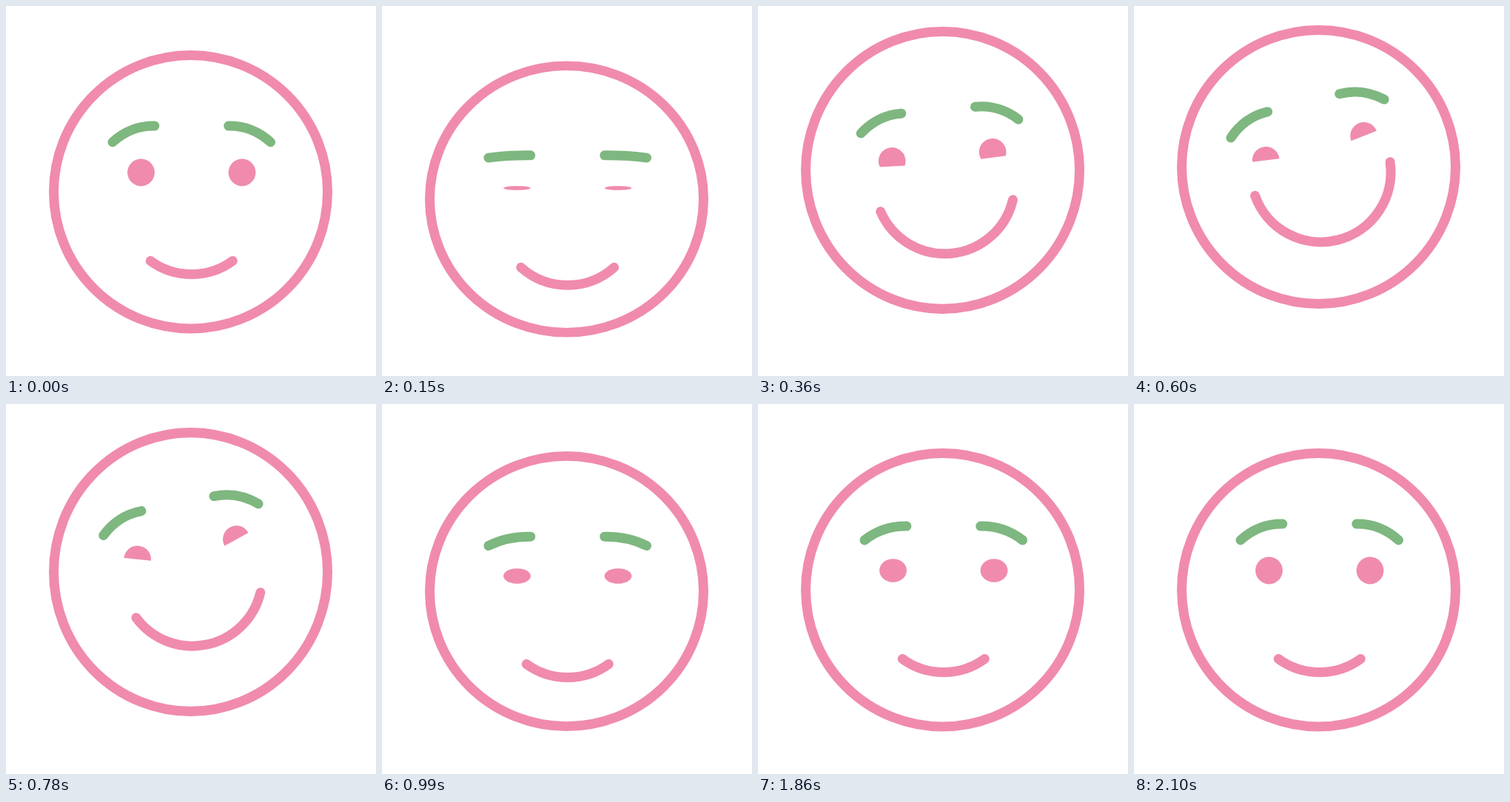
Animation, 500 px wide and 500 px high, one loop 3150 ms. Source, as an HTML page:

```html
<!DOCTYPE html>
<html lang="en">
<head>
<meta charset="utf-8">
<title>Smiling face</title>
<style>
  html, body { margin: 0; width: 100%; height: 100%; overflow: hidden; background: #fff; }
  svg { display: block; width: 100%; height: 100%; }
  .line { fill: none; stroke: #f08bad; stroke-width: 13; stroke-linecap: round; }
  .brow { stroke: #7eb77f; }
  .eye { fill: #f08bad; }
</style>
</head>
<body>
<svg viewBox="0 0 500 500">
  <circle id="head" class="line" r="185"/>
  <g id="face">
    <path id="browLeft" class="line brow"/>
    <path id="browRight" class="line brow"/>
    <path id="eyeLeft" class="eye"/>
    <path id="eyeRight" class="eye"/>
    <path id="mouth" class="line"/>
  </g>
</svg>
<script>
const LOOP = 3150, STEP = 30;
const HEAD_X = 249.5, FACE_X = 250.75, OUTER_R = 191.5;
const EYE_R = 18.4, MOUTH_R = 94.5;

// Each track lists [time in ms, value]; the curve rests at its extremes.
const tracks = {
  top: [[0, 60], [120, 82], [240, 32], [540, 25.5], [570, 25.5], [600, 26], [780, 32],
        [900, 82], [990, 64], [1110, 57], [1230, 60]],
  bottom: [[0, 442.5], [120, 451], [240, 426], [540, 408.5], [570, 408.5], [600, 409],
           [780, 422], [900, 451], [990, 442], [1230, 442.5]],
  eyeY: [[0, 225], [120, 250], [240, 220], [540, 190.5], [570, 190.5], [600, 191.5],
         [780, 196], [900, 252], [990, 232.5], [1110, 222], [1230, 225]],
  mouthY: [[0, 268], [120, 286], [240, 259.7], [540, 224], [570, 224], [600, 225],
           [780, 233], [900, 290], [990, 275], [1110, 265], [1230, 268]],
  smile: [[0, 36], [90, 36], [240, 57], [540, 85], [570, 85], [600, 84.3], [780, 65], [960, 36]],
  tilt: [[240, 0], [540, -14.4], [570, -14.4], [600, -14], [780, -11.5], [930, 0]],
  open: [[0, 1], [120, 0.1], [240, 0.55], [360, 1], [780, 1], [900, 0.1], [990, 0.56],
         [1080, 1], [1830, 1], [1950, 0.1], [1980, 0.1], [2100, 1]],
  lid: [[240, 0.9999], [450, 0], [870, 0], [930, 0.9999]],
  lidTurn: [[240, 0], [540, 6], [570, 6], [600, 7.3], [780, 17.3], [900, 0]]
};

const byId = id => document.getElementById(id);
const set = (id, name, value) => byId(id).setAttribute(name, value);

function tangent(keys, i) {
  if (i === 0 || i === keys.length - 1) return 0;
  const slope = j => (keys[j + 1][1] - keys[j][1]) / (keys[j + 1][0] - keys[j][0]);
  const before = slope(i - 1), after = slope(i);
  return before * after <= 0 ? 0 : 2 * before * after / (before + after);
}

function sample(keys, t) {
  const last = keys.length - 1;
  if (t <= keys[0][0]) return keys[0][1];
  if (t >= keys[last][0]) return keys[last][1];
  const i = keys.findIndex(key => key[0] > t) - 1;
  const [t0, v0] = keys[i], [t1, v1] = keys[i + 1];
  const span = t1 - t0, u = (t - t0) / span, w = 1 - u;
  return v0 * w * w * (1 + 2 * u) + v1 * u * u * (3 - 2 * u)
    + span * (tangent(keys, i) * u * w * w - tangent(keys, i + 1) * u * u * w);
}

function drawSide(name, side, p) {
  const x = d => FACE_X + side * d;
  const browBase = p.eyeY - 41;
  const browY = rise => browBase - rise * p.open;
  set('brow' + name, 'd',
    `M${x(106.8)} ${browY(0)}Q${x(82)} ${browY(22.5)} ${x(50)} ${browY(22)}`);

  const half = EYE_R * Math.sqrt(1 - p.lid ** 2), ry = EYE_R * p.open, cut = p.lid * ry;
  set('eye' + name, 'd', `M${-half} ${cut}A${EYE_R} ${ry} 0 1 1 ${half} ${cut}Z`);
  set('eye' + name, 'transform',
    `translate(${x(68.25)} ${p.eyeY}) rotate(${-side * p.lidTurn})`);
}

function draw(t) {
  const p = {};
  for (const name in tracks) p[name] = sample(tracks[name], t);

  const headY = (p.top + p.bottom) / 2;
  const stretch = (p.bottom - p.top) / (2 * OUTER_R);
  set('head', 'transform', `translate(${HEAD_X} ${headY}) scale(1 ${stretch})`);
  set('face', 'transform', `rotate(${p.tilt} ${HEAD_X} ${headY})`);
  drawSide('Left', -1, p);
  drawSide('Right', 1, p);

  const a = p.smile * Math.PI / 180;
  const dx = MOUTH_R * Math.sin(a), y = p.mouthY + MOUTH_R * Math.cos(a);
  set('mouth', 'd', `M${FACE_X - dx} ${y}A${MOUTH_R} ${MOUTH_R} 0 0 0 ${FACE_X + dx} ${y}`);
}

const start = performance.now();
function tick() {
  const t = (performance.now() - start) % LOOP;
  draw(Math.floor(t / STEP) * STEP);
  requestAnimationFrame(tick);
}
tick();
</script>
</body>
</html>
```
